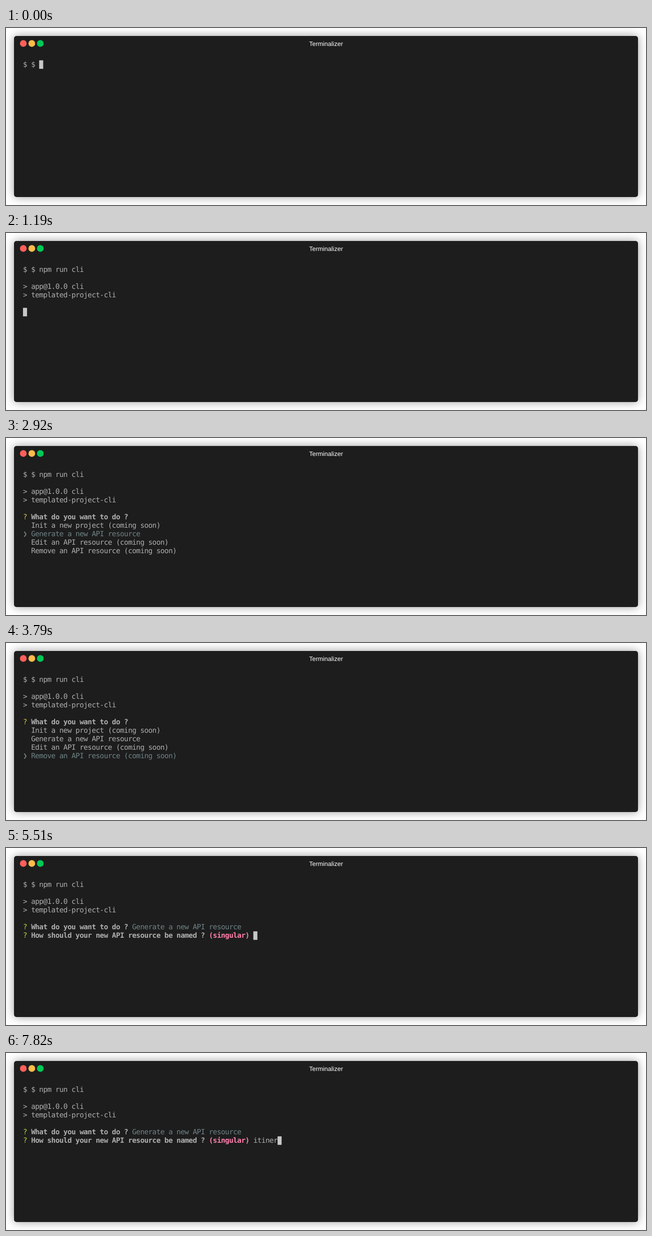
An HTML page for the animation above (8000 ms loop, 1280 by 355 pixels).

```html
<!DOCTYPE html>
<html lang="en">
<head>
<meta charset="utf-8">
<title>Terminal</title>
<style>
  html, body { margin: 0; width: 100%; height: 100%; overflow: hidden; background: #fff; }
  .window {
    position: absolute; left: 16px; top: 16px; width: 1248px; height: 322.6px;
    border-radius: 5px; background: #1d1d1d; box-shadow: 0 0 18px rgba(0, 0, 0, .4);
  }
  svg { position: absolute; left: 0; top: 0; }
  text { white-space: pre; text-rendering: geometricPrecision; }
  .title { font: 12.57px "Liberation Sans", Arial, sans-serif; fill: #fff; text-anchor: middle; }
  #screen { font: 16px "DejaVu Sans Mono", monospace; fill: #afafaf; }
</style>
</head>
<body>
<div class="window"></div>
<svg width="1280" height="355" viewBox="0 0 1280 355">
  <circle cx="34.6" cy="31" r="6.75" fill="#ff5f5a"/>
  <circle cx="51.6" cy="31" r="6.75" fill="#ffbd48"/>
  <circle cx="68.6" cy="31" r="6.75" fill="#00c957"/>
  <text class="title" x="640" y="35.9">Terminalizer</text>
  <g id="screen" transform="translate(34 64.8) scale(.898)"></g>
</svg>
<script>
const LOOP = 8000;
const CELL_W = 9, CELL_H = 19, BASELINE = 14.4;
const GOLD = '#dcc350', LIME = '#b3e33b', TEAL = '#708387', PINK = '#ff7fac', CURSOR = '#c7c7c7';
const screen = document.getElementById('screen');

// A line is a list of runs: [text, colour, bold].
const plain = text => [[text]];
const command = typed => plain('$ $ ' + typed);
const header = [command('npm run cli'), [], plain('> app@1.0.0 cli'), plain('> templated-project-cli'), []];
const question = (text, mark) => [['? ', mark], [text + ' ', null, true]];
const choices = [
  'Init a new project (coming soon)',
  'Generate a new API resource',
  'Edit an API resource (coming soon)',
  'Remove an API resource (coming soon)'
];

const lineLength = line => line.reduce((sum, [text]) => sum + text.length, 0);
const withCursor = lines => ({ lines, cursor: [lineLength(lines.at(-1)), lines.length - 1] });

const prompt = typed => withCursor([command(typed)]);

function menu(selected, hint = '') {
  const ask = [...question('What do you want to do ?', GOLD), [hint]];
  const items = choices.map((text, i) =>
    i === selected ? [['❯ ' + text, TEAL]] : plain('  ' + text));
  return { lines: [...header, ask, ...items] };
}

function naming(typed) {
  const answer = [...question('What do you want to do ?', LIME), [choices[1], TEAL]];
  const ask = [...question('How should your new API resource be named ?', LIME),
    ['(singular)', PINK, true], [' ' + typed]];
  return withCursor([...header, answer, ask]);
}

const typing = (text, times, view) => times.map((t, i) => [t, view(text.slice(0, i + 1))]);
const steps = [
  [0, prompt('')],
  ...typing('npm run cli', Array.from({ length: 11 }, (_, i) => 80 * (i + 1)), prompt),
  [960, withCursor([command('npm run cli'), []])],
  [1190, withCursor([...header, []])],
  [1450, menu(0, '(Use arrow keys)')],
  [2920, menu(1)],
  [3580, menu(2)],
  [3790, menu(3)],
  [4090, menu(2)],
  [4300, menu(1)],
  [5510, naming('')],
  ...typing('itiner', [6920, 7240, 7400, 7610, 7720, 7820], naming)
];

function add(tag, attrs, text = '') {
  const el = document.createElementNS('http://www.w3.org/2000/svg', tag);
  for (const key in attrs) el.setAttribute(key, attrs[key]);
  el.textContent = text;
  screen.append(el);
}

function draw({ lines, cursor }) {
  screen.replaceChildren();
  lines.forEach((line, row) => {
    let col = 0;
    for (const [text, colour, bold] of line) {
      const x = Array.from(text, (_, i) => (col + i) * CELL_W).join(' ');
      const attrs = { x, y: row * CELL_H + BASELINE };
      if (colour) attrs.fill = colour;
      if (bold) attrs['font-weight'] = 'bold';
      if (text.trim()) add('text', attrs, text);
      col += text.length;
    }
  });
  if (cursor) {
    const [col, row] = cursor;
    add('rect', { x: col * CELL_W, y: row * CELL_H, width: CELL_W, height: CELL_H, fill: CURSOR });
  }
}

const start = performance.now();
let shown = null;

function tick() {
  const time = (performance.now() - start) % LOOP;
  const step = steps.findLast(([at]) => at <= time);
  if (step !== shown) draw((shown = step)[1]);
  requestAnimationFrame(tick);
}
tick();
</script>
</body>
</html>
```
